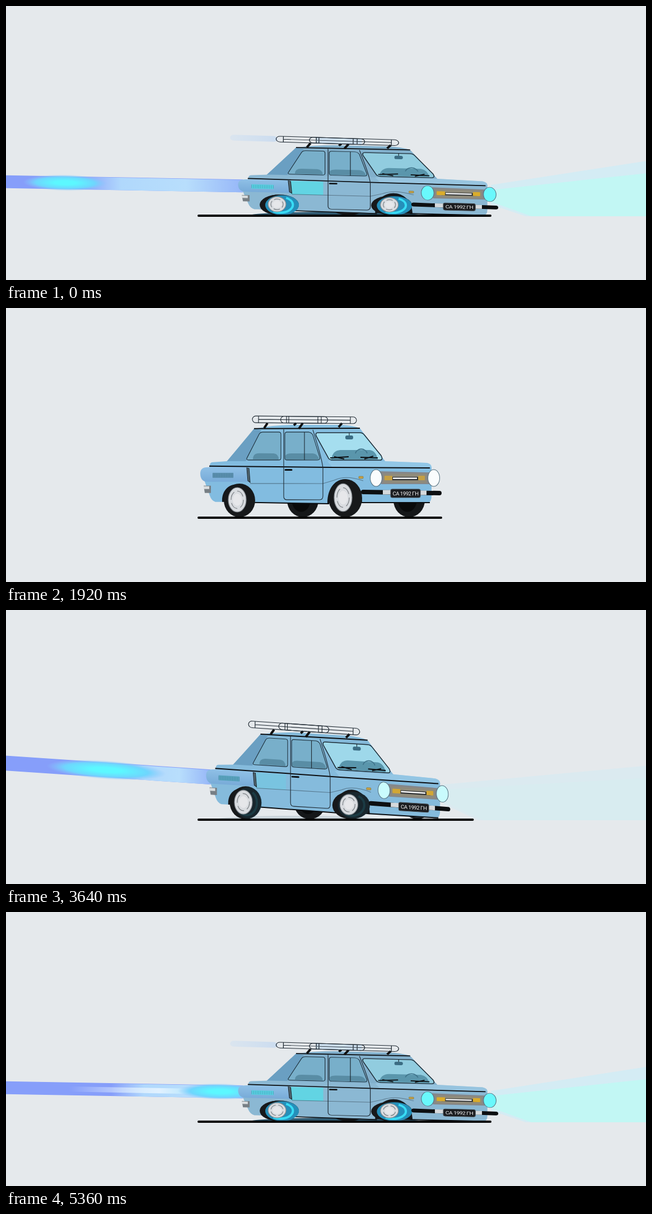
Animation of 1143x490 px, one loop 5.4 s. Source, as an HTML page:

```html
<!DOCTYPE html>
<html lang="uk">
<head>
<meta charset="utf-8">
<title>Blue car</title>
<style>
html,body{margin:0;width:100%;height:100%;overflow:hidden;background:#e5e9ec}
svg{display:block;width:100vw;height:100vh}
.ln{fill:none;stroke:#1d2730;stroke-width:1.1}
.bk{fill:none;stroke:#0b0d10;stroke-width:2}
.seat{fill:#598da5}
.glass{fill:#78afca;stroke:#1d2f3b;stroke-width:1.1}
.amber{fill:#c5a044}
text{font:9.6px Roboto,"Liberation Sans",sans-serif;letter-spacing:-.5px;fill:#f4f4f4}
</style>
</head>
<body>
<svg viewBox="0 0 1143 490">
<defs>
  <radialGradient id="puff"><stop offset=".25" stop-color="#5cf8ff"/><stop offset=".7" stop-color="#6ed6fd"/><stop offset="1" stop-color="#8cc4fc" stop-opacity="0"/></radialGradient>
  <linearGradient id="mist"><stop offset="0" stop-color="#b4d8fc" stop-opacity="0"/><stop offset=".25" stop-color="#b0d8fc"/><stop offset=".65" stop-color="#b8defc"/><stop offset="1" stop-color="#96b6f8"/></linearGradient>
  <linearGradient id="wake"><stop offset="0" stop-color="#e8f2ff" stop-opacity="0"/><stop offset=".6" stop-color="#e0f1ff"/><stop offset="1" stop-color="#8fdcfb"/></linearGradient>
  <linearGradient id="trail"><stop offset="0" stop-color="#cfe0f2" stop-opacity=".5"/><stop offset="1" stop-color="#cbdcef"/></linearGradient>
  <linearGradient id="pod" x2="0" y2="1"><stop offset="0" stop-color="#8fc0e6"/><stop offset="1" stop-color="#78abd8"/></linearGradient>
  <clipPath id="floor"><rect width="1143" height="376"/></clipPath>
</defs>
<g clip-path="url(#floor)">
  <g id="beam">
    <polygon id="outer" fill="#d4ecf4"/>
    <polygon id="inner" fill="#c2f7f4"/>
  </g>
  <g id="flame">
    <rect x="-1000" y="-13.5" width="1000" height="27" fill="#869efa"/>
    <rect id="mistBar" y="-12.5" height="26" fill="url(#mist)"/>
    <rect id="streak" y="-5" width="250" height="11" fill="url(#wake)"/>
    <ellipse id="blob" ry="17" fill="url(#puff)"/>
  </g>
  <ellipse id="shade" cy="374" ry="6" fill="#1c4a63"/>
  <g id="far"></g>
  <g id="car">
    <path id="roof" d="M444 216Q480 209 520 209H598Q620 210 632 215L678 275H394Z"/>
    <path d="M443 216L394 275H428L456 219Z" fill="#6a9fc2"/>
    <path id="body" d="M364 282Q364 276 370 276L398 274H677L752 277Q761 279 760 287V336Q760 348 752 349H440L388 347H374Q367 345 364 336L354 308Z"/>
    <path d="M677 274L752 277Q761 280 760 285L582 284L574 274Z" fill="#a4d3ee" opacity=".45"/>
    <path d="M386 347C384 305 440 305 443 347ZM574 349C574 292 636 292 636 349Z" fill="#14181c"/>
    <path class="bk" d="M440 348L577 350M632 348H757" stroke-width="1.5"/>
    <path d="M347 298Q346 285 360 285H430Q436 298 436 311H360Q348 311 347 298Z" fill="url(#pod)"/>
    <rect id="glow" x="434" y="286" width="54" height="28" fill="#58dbe8"/>
    <rect id="vent" x="369" y="295" width="37" height="9"/>
    <path d="M369 299.5H406" stroke="#39718e" stroke-width="7" stroke-dasharray=".7 2.3" opacity=".55"/>
    <path d="M430 286L434 287L436 312L432 309Z" fill="#526670" stroke="#1a2229"/>
    <path d="M353 318H366V331H355Z" fill="#777f85"/><path d="M353 319H363V324H353Z" fill="#d9dddf"/>
    <path class="bk" d="M443 216L632 215M363 283L580 285L757 286"/>
    <path class="ln" d="M496 217V337Q496 343 502 343H560Q566 343 566 336V286Q564 268 548 218"/>
    <path class="ln" d="M436 314H566L586 308Q607 298 638 309" opacity=".45"/>
    <path class="glass" d="M459 222H487Q491 222 491 226V268Q491 272 487 272H433Q428 272 431 267L452 226Q454 222 459 222Z"/>
    <path class="seat" d="M441 271Q441 260 452 260H478Q487 261 487 271Z"/>
    <path class="glass" d="M502 222H541Q546 223 548 227L560 266Q562 272 556 272H502Q498 272 498 268V226Q498 222 502 222Z"/>
    <path class="seat" d="M499 271V264Q501 260 510 260H548Q557 261 559 271Z"/>
    <path class="ln" d="M533 222V272"/>
    <path id="shield" d="M557 223H632Q637 223 640 227L670 264Q674 272 668 272H584Q577 272 575 267L554 229Q552 223 557 223Z" stroke="#1c2a34" stroke-width="1.5"/>
    <path d="M581 271Q583 255 597 254H650Q661 256 664 271Z" fill="#5a96ac"/>
    <path d="M624 260A11 11 0 0 1 645 260" fill="none" stroke="#3f738a" stroke-width="1.8"/>
    <path d="M613 223V229" class="ln"/><rect x="606" y="228" width="14" height="7" rx="3" fill="#3b6c83"/>
    <path class="bk" d="M579 268L612 266M586 266L604 270M633 267L664 268M640 270L656 265" stroke-width="1.5"/>
    <path d="M499 289.5H510" stroke="#0c0f12" stroke-width="3" stroke-linecap="round"/>
    <rect x="630" y="301" width="8" height="4" rx="1" class="amber" stroke="#7b6b38" stroke-width=".6"/>
    <path d="M467 206L461 215M530 206L523 216M600 206L594 213M518 206L514 210" stroke="#111" stroke-width="4"/>
    <g id="rack">
      <g transform="rotate(.5 533 200)">
        <g id="smear">
          <rect x="370" y="194" width="72" height="12" rx="6" fill="url(#trail)"/>
          <rect x="500" y="194" width="70" height="12" fill="#bcd8ef" opacity=".6"/>
        </g>
        <g class="ln" stroke-width="1.3">
          <rect x="440" y="194" width="186" height="12" rx="6"/>
          <rect x="490.5" y="194" width="84" height="12" rx="6"/>
          <path d="M451 200H615M451 194V206M501 194V206M505 194V206M557 194V206M563 194V206M615 194V206"/>
        </g>
      </g>
    </g>
  </g>
  <g id="near"></g>
  <g id="front">
    <path d="M668 292L756 294V315H670Z" fill="#85878a"/>
    <path d="M674 296H751V313H674Z" fill="#8f8b7c"/>
    <path d="M684 305H743" stroke="#2d3033" stroke-width="6"/>
    <path d="M691 304.5H734" stroke="#fff" stroke-width="2.6"/>
    <g id="lamps"><rect x="676" y="300" width="14" height="8" rx="1"/><rect x="736" y="300" width="12" height="8" rx="1"/></g>
    <g id="heads" stroke="#54707f" stroke-width="1"><ellipse cx="661" cy="304" rx="10.5" ry="15"/><ellipse cx="764" cy="304" rx="10.5" ry="15"/></g>
    <path d="M638 329L774 331" stroke="#0d0f11" stroke-width="8" stroke-linecap="round"/>
    <path d="M673 329.5H688M740 330.5H751" stroke="#d5d9dc" stroke-width="8"/>
    <rect x="687" y="324" width="53" height="15" rx="3" fill="#1b1d20" stroke="#43474b"/>
    <text x="713.5" y="335.2" text-anchor="middle">СА 1992 ГН</text>
  </g>
</g>
<path id="ground" stroke="#000" stroke-width="4" stroke-linecap="round"/>
</svg>
<script>
const LOOP = 5400, STEP = 40, LAUNCH = 3400, FLOOR = 374;
const $ = id => document.getElementById(id);
const set = (el, attrs) => { for (const k in attrs) el.setAttribute(k, attrs[k]); };

const lerp = (a, b, u) => a + (b - a) * u;
const mix = (p, q, u) => `rgb(${p.map((v, i) => Math.round(lerp(v, q[i], u)))})`;
function smooth(x, a, b) {
  const u = Math.min(1, Math.max(0, (x - a) / (b - a)));
  return u * u * (3 - 2 * u);
}
const hump = (x, a, b) => x > a && x < b ? Math.sin(Math.PI * (x - a) / (b - a)) ** 2 : 0;
const pulse = (x, on, full, off, gone) => smooth(x, on, full) - smooth(x, off, gone);

// roof corner, right headlight and rear bumper, standing and at speed
const REST = [[443, 215], [764, 304], [359, 324]];
const FAST = [[524, 253], [870, 335.5], [433.5, 344.5]];
const LEVER = [.5, -1, .8];

// every value of the ride from the time since launch
function ride(c) {
  const speed = pulse(c, 150, 520, 2520, 2680);
  const lead = pulse(c, 0, 420, 2470, 2830);
  const wave = Math.cos(2 * Math.PI * (c - 960) / 2080) * speed;
  const dive = hump(c, 0, 480);
  const crouch = hump(c, -200, 120) + hump(c - LOOP, -200, 120);
  const since = Math.max(0, c - 2560);
  const ring = Math.exp(-since / 300) * Math.sin(2 * Math.PI * since / 360);
  const idle = pulse(c, 4300, 5000, 5100, 5400);
  return {
    speed, lead, sway: 6 * wave,
    heave: 7 * dive + 7 * ring - 3 * crouch,
    pitch: 1.5 * wave - 13 * dive + 11.5 * ring + 3.5 * idle,
    glow: pulse(c, 60, 520, 2500, 2950),
    light: pulse(c, 0, 450, 2500, 3100),
    fire: pulse(c, 0, 150, 2480, 2600)
  };
}

// affine map that carries the three resting anchors to the current ones
function affine(points) {
  const [[ax, ay], [bx, by], [cx, cy]] = points;
  const [[rx, ry], [sx, sy], [ux, uy]] = REST;
  const x1 = sx - rx, y1 = sy - ry, x2 = ux - rx, y2 = uy - ry, det = x1 * y2 - x2 * y1;
  const solve = (p, q) => [(p * y2 - q * y1) / det, (x1 * q - x2 * p) / det];
  const [a, c] = solve(bx - ax, cx - ax), [b, d] = solve(by - ay, cy - ay);
  return [a, b, c, d, ax - a * rx - c * ry, ay - b * rx - d * ry];
}

function oval(parent, attrs) {
  const el = document.createElementNS("http://www.w3.org/2000/svg", "ellipse");
  set(el, attrs);
  parent.appendChild(el);
  return (cx, cy, rx, ry, more) => set(el, {cx, cy, rx, ry, ...more});
}
function makeWheel() {
  const g = $("near");
  const tyre = oval(g, {fill: "#17191b"});
  const halo = oval(g, {fill: "#258fba"});
  const arc = oval(g, {fill: "none", stroke: "#38dcf5", "stroke-width": 4, pathLength: 100, "stroke-dasharray": "36 48 16 0"});
  const rim = oval(g, {fill: "#d9dce0", stroke: "#83898f", "stroke-width": 1.2});
  const ring = oval(g, {fill: "none", stroke: "#7c8085", "stroke-width": 1.2, pathLength: 100, "stroke-dasharray": "18 7"});
  const hub = oval(g, {fill: "#e6e7ea"});
  return (x, rx, ry, glow, turn) => {
    const y = FLOOR - ry, hx = x - 4, opacity = glow * glow;
    tyre(x, y, rx, ry);
    halo(x + 5, y + .5, rx * .86, ry * .96, {opacity});
    arc(x + 2, y, rx * .64, ry * .76, {opacity});
    rim(hx, y - 1, 16, ry * .73);
    ring(hx, y - 1, 11, ry * .52, {"stroke-dashoffset": turn});
    hub(hx, y - 1, 8, ry * .36);
  };
}
function makeFarWheel() {
  const tyre = oval($("far"), {fill: "#151719"});
  const rim = oval($("far"), {fill: "#090a0b"});
  return (x, rx, ry) => {
    tyre(x, FLOOR - ry, rx, ry);
    rim(x - 3, FLOOR - 1 - ry, rx * .6, ry * .72);
  };
}
const near = [makeWheel(), makeWheel()], far = [makeFarWheel(), makeFarWheel()];

function drawBeam(x, y, r) {
  const top = y - .23 * (1143 - x) - 2.5 * r.pitch;
  const cone = (up, down, edge, foot) =>
    ({points: `${x},${y - up} 1143,${edge} 1143,376 ${x + foot},376 ${x},${y + down}`});
  set($("beam"), {opacity: r.light});
  set($("outer"), cone(17, 18, top, 62));
  set($("inner"), {...cone(8, 13, top + 22, 72), opacity: smooth(r.lead, .35, 1)});
}

// puffs race backwards from the exhaust
function drawFlame(x, y, m, c, r) {
  const phase = (c + 46) % 80, fresh = phase < 26;
  const slack = 1 - r.lead;
  const puff = 280 * slack - 6.4 * phase;
  const start = Math.min(0, puff + (fresh ? -180 : 25));
  set($("flame"), {opacity: r.fire, transform: `matrix(${m[0]} ${1.4 * m[1] - .018} 0 ${m[3]} ${x} ${y})`});
  set($("blob"), {cx: puff, rx: 70 + 90 * slack});
  set($("mistBar"), {x: start, width: -start});
  set($("streak"), {x: puff - 250, opacity: +fresh});
}

function drawWheels(at, c, r) {
  const turn = -(r.lead * c / 3) % 100;
  const rear = 30 - 12 * r.speed - .33 * (r.heave + .8 * r.pitch);
  const front = 34 - 16 * r.speed - .33 * (r.heave - r.pitch);
  const rearW = 28 + (30 - rear) * .6, frontW = 30 + (34 - front) * .4;
  const x1 = at(417, 340)[0] - 2 * r.speed, x2 = at(606, 340)[0] - 5 * r.lead;
  near[0](x1, rearW, rear, r.glow, turn);
  near[1](x2, frontW, front, r.glow, turn);
  far[0](at(530, 352)[0], rearW, rear);
  far[1](at(720, 352)[0], rearW, rear);
  set($("shade"), {cx: (x1 + x2) / 2, rx: (x2 - x1) / 2 + 50, opacity: r.speed * .9});
}

function paint(r) {
  set($("body"), {fill: mix([130, 188, 224], [139, 184, 211], r.glow)});
  set($("roof"), {fill: mix([133, 190, 224], [130, 176, 204], r.glow)});
  set($("shield"), {fill: mix([165, 222, 239], [145, 204, 223], r.glow)});
  set($("vent"), {fill: mix([91, 143, 174], [88, 208, 225], r.glow)});
  set($("glow"), {opacity: r.glow * .8});
  set($("lamps"), {fill: mix([197, 160, 68], [218, 172, 44], r.lead)});
  set($("heads"), {fill: mix([250, 252, 253], [105, 248, 252], r.glow)});
}

function draw(t) {
  const c = (t - LAUNCH + LOOP) % LOOP, r = ride(c);
  const m = affine(REST.map(([x, y], i) => [
    lerp(x, FAST[i][0], r.speed) + r.sway,
    lerp(y, FAST[i][1], r.speed) + r.heave + LEVER[i] * r.pitch
  ]));
  const at = (x, y) => [m[0] * x + m[2] * y + m[4], m[1] * x + m[3] * y + m[5]];
  for (const id of ["car", "front"]) set($(id), {transform: `matrix(${m})`});

  drawBeam(...at(766, 304), r);
  drawFlame(...at(355, 299), m, c, r);
  drawWheels(at, c, r);
  paint(r);

  // the rack lags behind the roof
  const k = 1 + r.lead * 17 / 186;
  set($("rack"), {transform: `translate(${626 - 13 * r.lead - 626 * k} 0) scale(${k} 1)`});
  set($("smear"), {opacity: smooth(r.lead, .75, 1)});
  set($("ground"), {d: `M344 375H${777 + 94 * r.lead + r.sway}`});
}

let start;
function tick(now) {
  start ??= now;
  draw(Math.floor((now - start) % LOOP / STEP) * STEP);
  requestAnimationFrame(tick);
}
draw(0);
requestAnimationFrame(tick);
</script>
</body>
</html>
```
